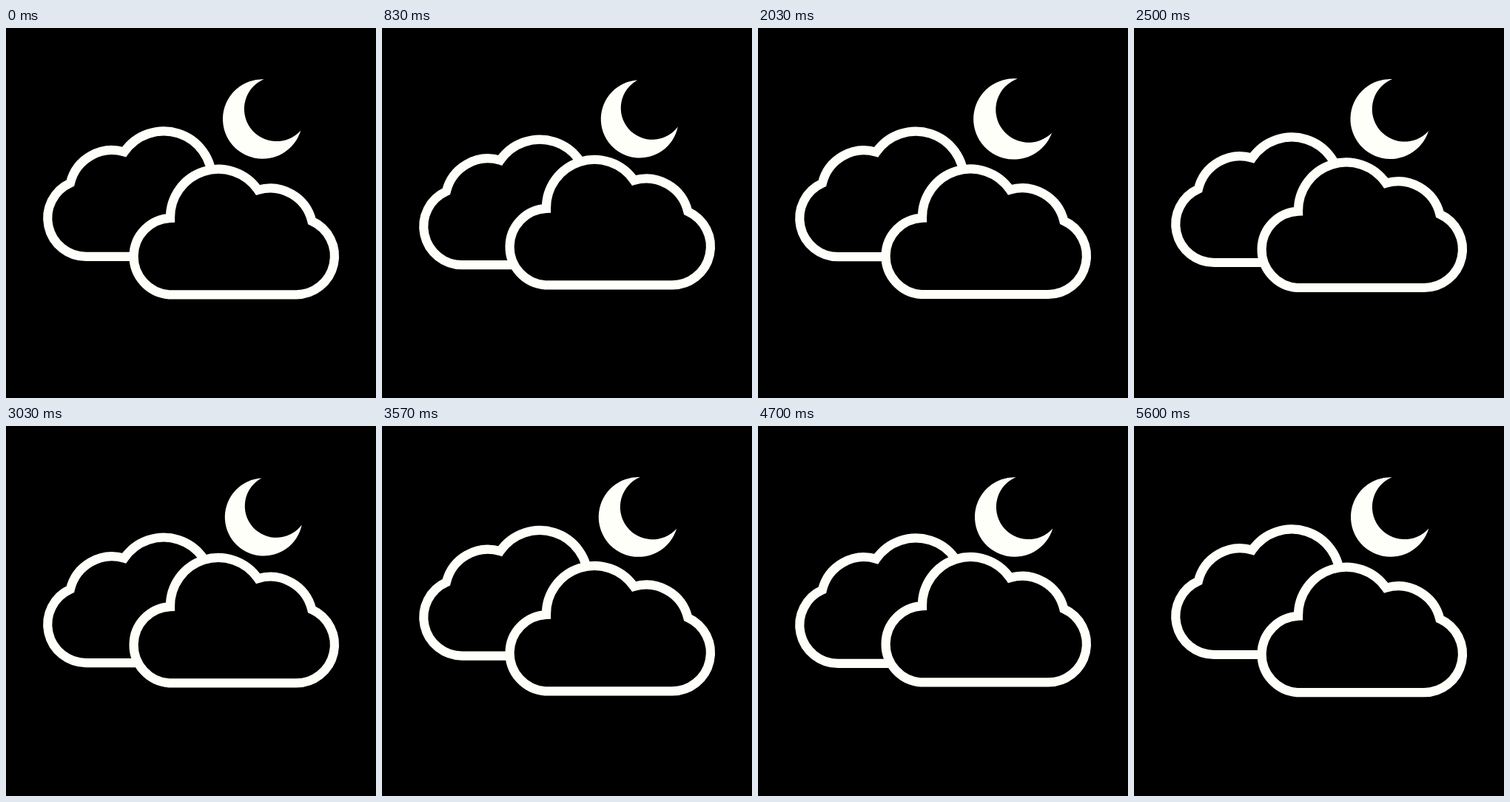
An HTML page that plays this animation: 500x500 px, repeating every 5.63 s.

```html
<!DOCTYPE html>
<html lang="en">
<head>
<meta charset="utf-8">
<title>Cloudy night</title>
<style>
  html, body { margin: 0; width: 100%; height: 100%; overflow: hidden; background: #000; }
  svg { display: block; width: 100%; height: 100%; }
</style>
</head>
<body>
<svg viewBox="0 0 500 500">
  <defs>
    <path id="cloud" fill="#000" stroke="#fffffa" stroke-width="12.2" stroke-miterlimit="8"
      d="M222 250 A65 65 0 0 1 340.5 212 A58 58 0 0 1 413.3 254
         A52 52 0 0 1 391.3 353.4 H220.5 A51.8 51.8 0 0 1 222 250 Z"/>
  </defs>
  <path id="moon" fill="#fffffa" d="M1 -53.8 A53.8 53.8 0 1 0 50.8 15.4 A43.7 43.7 0 1 1 1 -53.8 Z"/>
  <use id="back" href="#cloud"/>
  <use id="front" href="#cloud"/>
</svg>
<script>
  const LOOP = 5630;
  const BOB = LOOP / 3;       // one up-and-down of the clouds
  const BOB_PEAK = 50;
  const SWING_START = 463;
  const SWING_STEP = 366.7;   // one sweep of the moon from side to side
  const SWING_STEPS = 11;

  const [moon, back, front] = ['moon', 'back', 'front'].map(id => document.getElementById(id));
  const move = (el, value) => el.setAttribute('transform', value);
  const ease = x => (1 - Math.cos(Math.PI * x)) / 2;

  // The moon leaves rest, sweeps left and right, then returns to rest.
  function swing(t) {
    const x = (t - SWING_START) / SWING_STEP;
    if (x <= 0 || x >= SWING_STEPS) return 0;
    if (x < 1) return -ease(x);
    if (x > SWING_STEPS - 1) return ease(SWING_STEPS - x);
    return Math.cos(Math.PI * x);
  }

  function draw(t) {
    const bob = Math.cos(2 * Math.PI * (t - BOB_PEAK) / BOB);
    const u = swing(t);
    move(front, `translate(0 ${7 * bob})`);
    move(back, `translate(500.2 ${-38.5 - 6.1 * bob}) scale(-1 1)`);
    move(moon, `translate(${347.5 - 1.5 * u} 123) rotate(${5.2 * u}) scale(${1 + 0.024 * u})`);
  }

  const begin = performance.now();
  function tick() {
    draw((performance.now() - begin) % LOOP);
    requestAnimationFrame(tick);
  }
  tick();
</script>
</body>
</html>
```
